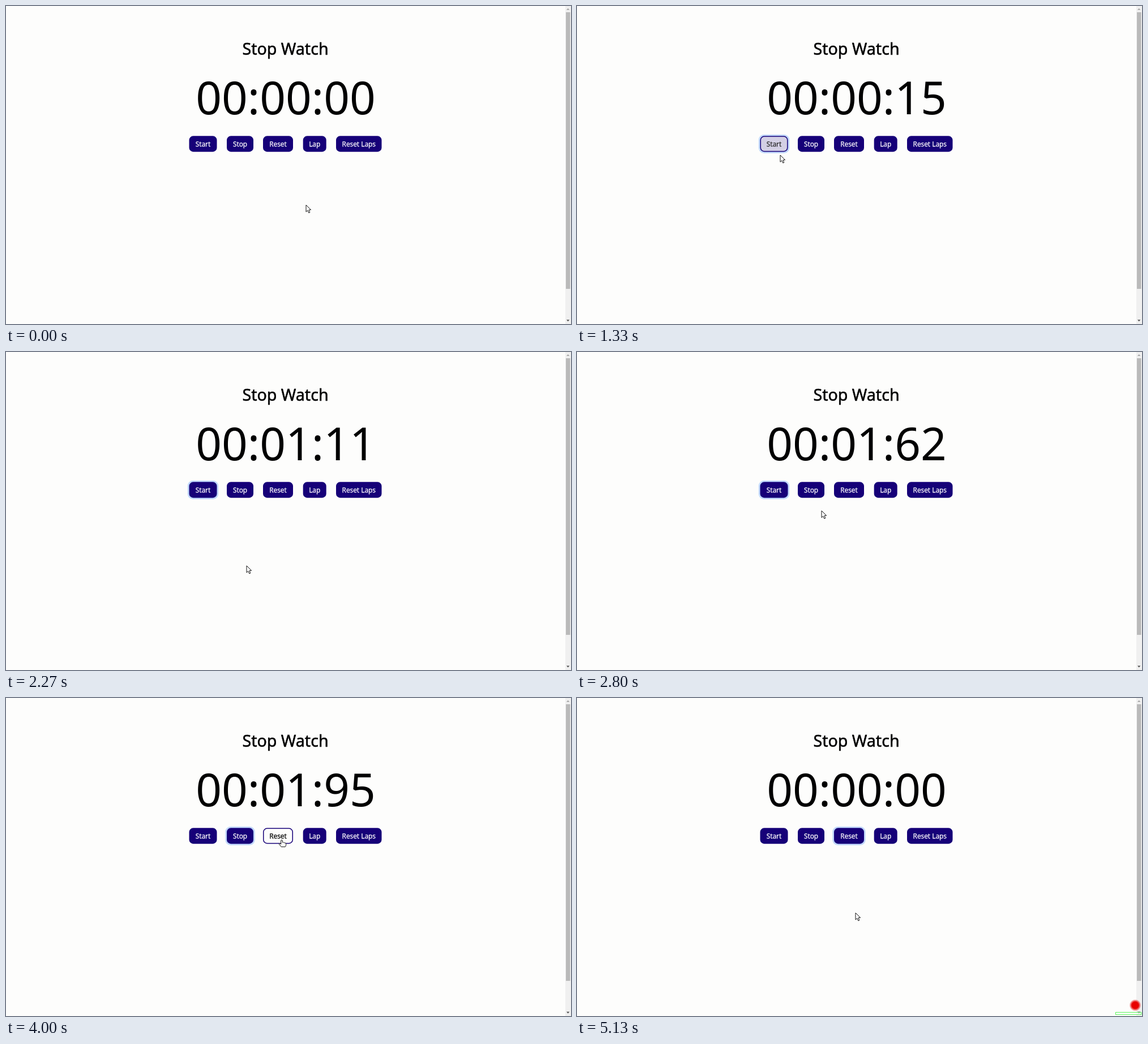
An HTML page that plays this animation: 998 by 561 pixels, repeating every 5.39 s.

```html
<!DOCTYPE html>
<html lang="en">
<head>
<meta charset="utf-8">
<title>Stop Watch</title>
<style>
  html, body { margin: 0; width: 100%; height: 100%; overflow: hidden; background: #fdfdfc; }
  svg { display: block; width: 998px; height: 561px; }
  text { font-family: "Noto Sans", "Open Sans", sans-serif; text-anchor: middle; }
  #title { font-size: 28.6px; stroke: #000; stroke-width: .55px; }
  #clock { font-size: 80px; }
  .label { font-size: 11.8px; stroke-width: .25px; }
  .pointer { fill: #fff; stroke: #111; stroke-linejoin: round; }
</style>
</head>
<body>
<svg id="stage" viewBox="0 0 998 561">
  <defs>
    <radialGradient id="glow">
      <stop offset=".55" stop-color="#e80000"/>
      <stop offset=".72" stop-color="#e80000" stop-opacity=".65"/>
      <stop offset="1" stop-color="#e80000" stop-opacity="0"/>
    </radialGradient>
  </defs>
  <rect x="988" width="10" height="561" fill="#f0f0f0"/>
  <rect x="989" y="11" width="7.5" height="488" fill="#bababa"/>
  <path d="M990 7l2.7-3 2.7 3z" fill="#a5a5a5"/>
  <path d="M990 553.5l2.7 3 2.7-3z" fill="#505050"/>
  <text id="title" x="493.5" y="86.3">Stop Watch</text>
  <text id="clock" x="494" y="191">00:00:00</text>
  <g id="buttons"></g>
  <path id="arrow" class="pointer" d="M0 0V12.2L2.8 9.6 4.8 14 6.8 13.1 4.9 8.8 8.6 8.6Z"/>
  <path id="hand" class="pointer" d="M-1.3 8V1.2Q0-.8 1.3 1.2V4.8Q2.6 3.8 3.6 5.2 5 4.5 5.7 5.9 7.6 5.6 7.6 7.4V9.4Q7.4 11 6.2 12.6H-.8L-4.4 8Q-4.6 6.2-3 6.5Z"/>
  <g id="recorder">
    <circle cx="986" cy="542" r="10.5" fill="url(#glow)"/>
    <rect x="951.5" y="554.5" width="45" height="4" fill="#f4fff4" fill-opacity=".4" stroke="#5cf55c"/>
  </g>
</svg>
<script>
const LOOP = 5390, STEP = 1000 / 15, FADE = 150;
const NAVY = [22, 0, 120], PAPER = [253, 253, 252], PRESSED = [231, 231, 240];
const WHITE = [255, 255, 255], BLACK = [0, 0, 0];
const el = id => document.getElementById(id);

// Times in ms: the pointer enters and leaves, the button goes down and up, focus moves on.
const buttons = [
  { label: 'Start', x: 323.5, w: 49, enter: 590, leave: 1240, down: 860, up: 1060, blur: 3060 },
  { label: 'Stop', x: 390, w: 47, enter: 2880, leave: 3190, down: 3060, up: 3140, blur: 4195 },
  { label: 'Reset', x: 454, w: 53, enter: 3800, leave: 4350, down: 4195, up: 4260, blur: 1e5 },
  { label: 'Lap', x: 524.7, w: 41 },
  { label: 'Reset Laps', x: 583, w: 80.5 }
];

// Pointer stops: time, x, y
const path = [
  [330, 530, 350.5], [660, 349, 245.5], [1190, 349, 245.5], [1530, 425, 377],
  [2460, 425, 377], [2800, 432, 280], [2930, 416, 247], [3150, 416, 247],
  [3335, 509, 381], [3470, 509, 381], [3860, 486.5, 250], [4270, 486.5, 250],
  [4530, 492, 379]
];

// Pauses in which the picture stands still: from, to
const pauses = [[0, 130], [867, 1000], [3334, 3530], [4000, 4200], [4534, 4870]];

const ramp = (t, a, d) => Math.min(1, Math.max(0, (t - a) / d));
const mix = (a, b, k) => a.map((v, i) => v + (b[i] - v) * k);
const rgb = c => `rgb(${c.map(Math.round)})`;
const pad = n => String(n).padStart(2, '0');

function add(tag, attrs) {
  const node = document.createElementNS('http://www.w3.org/2000/svg', tag);
  for (const key in attrs) node.setAttribute(key, attrs[key]);
  return el('buttons').appendChild(node);
}

for (const b of buttons) {
  b.ring = add('rect', { x: b.x - 2.7, y: 226.8, width: b.w + 5.4, height: 33, rx: 9.5, fill: '#c1d8fb', opacity: 0 });
  b.box = add('rect', { x: b.x + .75, y: 230.1, width: b.w - 1.5, height: 26.3, rx: 6.5, fill: rgb(NAVY), stroke: rgb(NAVY), 'stroke-width': 1.5 });
  b.text = add('text', { class: 'label', x: b.x + b.w / 2, y: 247.6, fill: '#fff', stroke: '#fff' });
  b.text.textContent = b.label;
}

function drawButton(b, t) {
  if (!b.enter) return;
  const hover = ramp(t, b.enter, FADE) - ramp(t, b.leave, FADE);
  const focus = ramp(t, b.up, FADE) - ramp(t, b.blur, FADE);
  const face = t >= b.down && t < b.up ? PRESSED : PAPER;
  const ink = rgb(mix(WHITE, BLACK, hover));
  b.box.setAttribute('fill', rgb(mix(NAVY, face, hover)));
  b.text.setAttribute('fill', ink);
  b.text.setAttribute('stroke', ink);
  b.ring.setAttribute('opacity', Math.max(0, focus));
}

function pointerAt(t) {
  const i = path.findIndex(p => p[0] > t);
  if (i === 0) return path[0].slice(1);
  if (i < 0) return path[path.length - 1].slice(1);
  const [from, to] = [path[i - 1], path[i]];
  const k = ramp(t, from[0], to[0] - from[0]);
  return mix(from, to, k * k * (3 - 2 * k)).slice(1);
}

function draw(time) {
  let t = Math.floor(time / STEP + .01) * STEP + .5;
  const pause = pauses.find(([a, b]) => t >= a && t < b);
  if (pause) t = pause[0];

  const ticks = t >= 4260 ? 0 : Math.min(195, Math.max(0, Math.round(66 + (t - 1800) * .096)));
  el('clock').textContent = `00:${pad(Math.floor(ticks / 100))}:${pad(ticks % 100)}`;
  buttons.forEach(b => drawButton(b, t));

  const over = buttons.some(b => t >= b.enter && t < b.leave);
  const place = `translate(${pointerAt(t).map(Math.round)})`;
  for (const id of ['arrow', 'hand']) {
    el(id).setAttribute('transform', place);
    el(id).style.display = (id === 'hand') === over ? '' : 'none';
  }
  el('recorder').style.display = time >= 5130 ? '' : 'none';
}

const start = performance.now();
function frame() {
  draw((performance.now() - start) % LOOP);
  requestAnimationFrame(frame);
}
frame();
</script>
</body>
</html>
```
